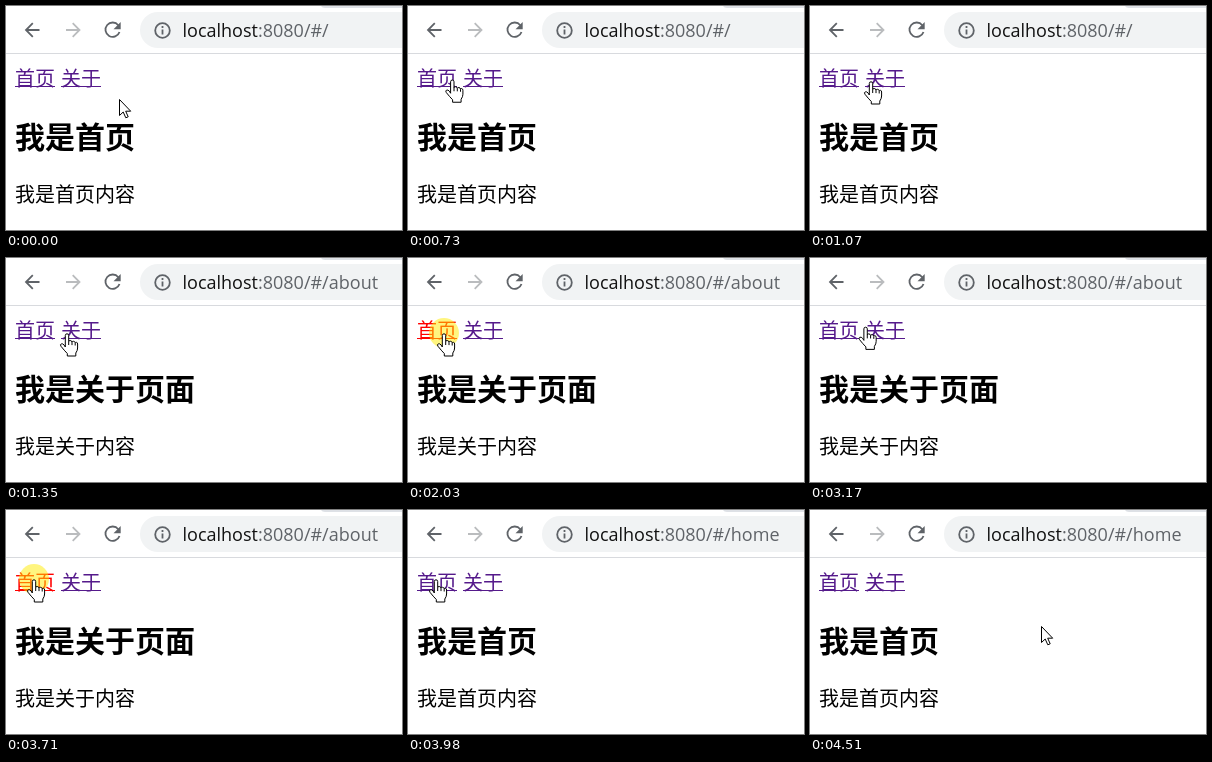
Recreate the animation shown at these times as an HTML page. Size 396x224 px, loop 4580 ms.

```html
<!DOCTYPE html>
<html lang="zh-CN">
<head>
<meta charset="utf-8">
<title>Router demo</title>
<style>
  html, body { margin: 0; width: 100%; height: 100%; overflow: hidden; background: #fff; }
  svg { display: block; }
  .page { font: 300 20px "Noto Sans CJK SC", "Noto Sans CJK", sans-serif; }
  .heading { font-size: 30px; font-weight: bold; }
  .url { font: 18px "Open Sans", "Noto Sans", sans-serif; }
  .link { color: #551a8b; fill: currentColor; }
  .link.active { color: #f00; }
  .icon { fill: none; stroke: #5f6368; stroke-width: 1.8; }
  .disabled { stroke: #babcbe; }
  .cursor { fill: #fff; stroke: #000; stroke-width: 1; stroke-linejoin: round; }
</style>
</head>
<body>
<svg width="396" height="224" viewBox="0 0 396 224">
  <path d="M315 0h81v2h-77q-3 0-4-2z" fill="#dee1e6"/>
  <rect y="47" width="396" height="1" fill="#d8dade"/>
  <rect x="134" y="6" width="300" height="36" rx="18" fill="#f1f3f4"/>
  <g class="icon">
    <path id="chevron" d="M33.5 24H20M26.8 17.2L20 24l6.8 6.8"/>
    <path class="disabled" d="M60 24h13.5M66.7 17.2l6.8 6.8-6.8 6.8"/>
    <path d="M112.3 19.2A7.2 7.2 0 1 0 113.5 26"/>
    <circle cx="156.5" cy="24.5" r="7.3"/>
    <path d="M156.5 23.5v5M156.5 20v2"/>
  </g>
  <path d="M114.7 16v7.2h-7.2z" fill="#5f6368"/>
  <text class="url" x="176.5" y="31" fill="#111">localhost<tspan fill="#5f6368" id="path"></tspan></text>

  <g class="page">
    <g class="link"><text x="9" y="79.5">首页</text><rect x="9" y="80" width="40" height="1"/></g>
    <g class="link"><text x="55" y="79.5">关于</text><rect x="55" y="80" width="40" height="1"/></g>
    <text class="heading" id="heading" x="9" y="142"></text>
    <text id="content" x="9" y="195.5"></text>
  </g>

  <circle id="halo" r="15" fill="#ffec00" fill-opacity=".5"/>
  <path id="arrow" class="cursor" d="M.5.5V16.5L4.2 13l2.6 5.8 2.4-1-2.5-5.6H11.7z"/>
  <g id="hand" class="cursor">
    <path d="M-1.7 14V2.5a1.7 1.7 0 0 1 3.4 0V8.5q0-1 1.5-1t1.8 1.6q.2-.9 1.6-.8t1.6 1.5q.3-.6 1.2-.5 1.2.2 1.2 1.7V15q0 2.5-1.8 5v3H.3v-2.5Q-2.7 17.5-6 13.3q-1.2-1.8.2-2.4t2.8 1z"/>
    <path d="M1.7 8.5V12M5 9.1v3M8.2 10v2.5" fill="none"/>
  </g>
</svg>
<script>
const LOOP = 4580;
const TICK = 67.4; // the pointer is sampled at about 15 Hz
const ROUTE_DELAY = 70;

const home = { link: 0, route: "home", name: "首页", suffix: "" };
const about = { link: 1, route: "about", name: "关于", suffix: "页面" };
const firstPage = { ...home, route: "" };

const clicks = [
  { press: 1140, release: 1280, page: about },
  { press: 2030, release: 2230, page: home },
  { press: 2780, release: 2910, page: about },
  { press: 3710, release: 3910, page: home }
];

const origin = { x: 113, y: 93 };
const moves = [
  { start: 50, end: 540, x: 42, y: 73 },
  { start: 650, end: 1070, x: 61, y: 75 },
  { start: 1350, end: 1690, x: 36, y: 75 },
  { start: 2300, end: 2380, x: 48, y: 70 },
  { start: 2640, end: 2760, x: 73, y: 68 },
  { start: 2960, end: 3450, x: 28, y: 69 },
  { start: 4110, end: 4510, x: 231, y: 116 }
];

const $ = id => document.getElementById(id);
const links = document.querySelectorAll(".link");

function pointerAt(time) {
  const t = Math.floor(time / TICK + 0.2) * TICK;
  return moves.reduce((from, { start, end, x, y }) => {
    const u = Math.min(1, Math.max(0, (t - start) / (end - start)));
    const eased = u * u * (3 - 2 * u);
    return { x: from.x + (x - from.x) * eased, y: from.y + (y - from.y) * eased };
  }, origin);
}

function place(id, { x, y }, visible) {
  $(id).setAttribute("transform", `translate(${x} ${y})`);
  $(id).style.display = visible ? "" : "none";
}

function render(t) {
  const lastClick = clicks.findLast(c => t >= c.release + ROUTE_DELAY);
  const page = lastClick ? lastClick.page : firstPage;
  $("path").textContent = ":8080/#/" + page.route;
  $("heading").textContent = "我是" + page.name + page.suffix;
  $("content").textContent = "我是" + page.name + "内容";

  const click = clicks.find(c => t >= c.press && t < c.release);
  links.forEach((link, i) => link.classList.toggle("active", click?.page.link === i));

  const pointer = pointerAt(t);
  const overLink = pointer.x >= 9 && pointer.x <= 95 && pointer.y > 60 && pointer.y < 84;
  place("halo", pointer, !!click);
  place("hand", pointer, overLink);
  place("arrow", pointer, !overLink);
}

const start = performance.now();
function frame() {
  render((performance.now() - start) % LOOP);
  requestAnimationFrame(frame);
}
frame();
</script>
</body>
</html>
```
